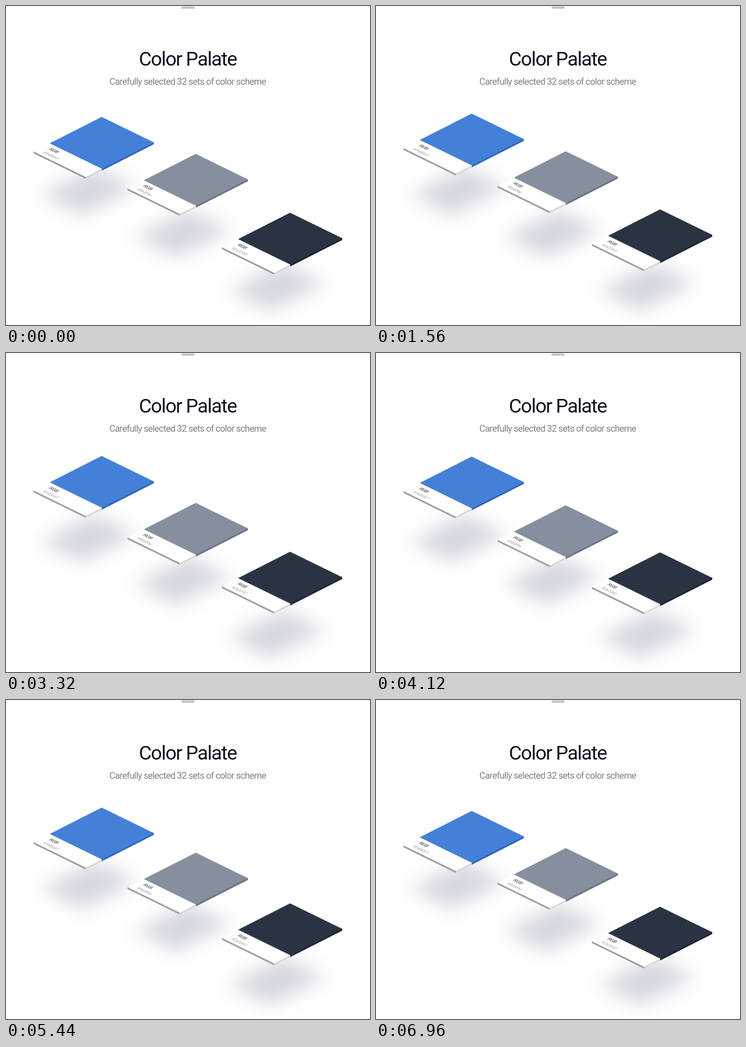
Animation of 799 by 701 pixels, one loop 7000 ms. Source, as an HTML page:

```html
<!DOCTYPE html>
<html lang="en">
<head>
<meta charset="utf-8">
<title>Color Palate</title>
<style>
  html, body { margin: 0; width: 100%; height: 100%; overflow: hidden; background: #fff; }
  svg { display: block; width: 799px; height: 701px; }
  text { font-family: Roboto, "Open Sans", sans-serif; }
  .title { font-size: 43px; letter-spacing: -1.6px; fill: #110d20; text-anchor: middle; }
  .subtitle { font-size: 20px; letter-spacing: -.8px; fill: #828282; text-anchor: middle; }
  .name { font-size: 11px; letter-spacing: -.4px; fill: #34343f; }
  .hex { font-size: 10px; letter-spacing: -.5px; fill: #a6a6a6; }
  .face { fill: var(--face); }
  .side { fill: var(--side); }
  .shadow { fill: #d5d8df; }

  .blue { --face: #4480d8; --side: #3064b6; }
  .gray { --face: #868f9e; --side: #6a7182; }
  .dark { --face: #2a3342; --side: #1d2533; }

  /* Each half of the loop eases in and out */
  .float { animation: float 7s cubic-bezier(.333, 0, .667, 1) infinite; }
  .gray .float { animation-delay: -2.13s; }
  @keyframes float {
    0%, 100% { transform: translateY(0); }
    50% { transform: translateY(-17.7px); }
  }
</style>
</head>
<body>
<svg viewBox="0 0 799 701">
  <defs>
    <filter id="blur" x="-50%" y="-70%" width="200%" height="240%" color-interpolation-filters="sRGB">
      <feGaussianBlur stdDeviation="20"/>
    </filter>

    <!-- Both shapes are placed by the card's top corner -->
    <polygon id="shadow" class="shadow" filter="url(#blur)"
      points="-15,110 77,155 -43,216 -134,171"/>
    <g id="card">
      <polygon fill="#9c9c9c" points="-149.5,75 -35,131 -35,136 -149.5,80"/>
      <polygon fill="#d6d6d6" points="-35,131 .5,113 .5,118 -35,136"/>
      <polygon class="side" points=".5,113 114.5,55 114.5,60 .5,118"/>
      <polygon fill="#fff" points="-113.5,57.7 1,113.7 -35,132 -149.5,76"/>
      <polygon class="face" points="0,0 114.5,56 .5,114 -114,58"/>
      <text class="name" transform="matrix(.898 .439 -.892 .452 -114 58)" x="13" y="16.5">RGB</text>
    </g>
  </defs>

  <rect x="385" y="1" width="29" height="5" rx="2.5" fill="#c4c4c4"/>
  <text class="title" x="399" y="131">Color Palate</text>
  <text class="subtitle" x="399" y="173">Carefully selected 32 sets of color scheme</text>

  <use href="#shadow" x="210" y="243.8"/>
  <use href="#shadow" x="416.5" y="336.8"/>
  <use href="#shadow" x="623.5" y="454.3"/>

  <g class="blue" transform="translate(210 243.8)">
    <g class="float">
      <use href="#card"/>
      <text class="hex" transform="matrix(.898 .439 -.892 .452 -114 58)" x="13" y="32">#3480d7</text>
    </g>
  </g>
  <g class="gray" transform="translate(416.5 336.8)">
    <g class="float">
      <use href="#card"/>
      <text class="hex" transform="matrix(.898 .439 -.892 .452 -114 58)" x="13" y="32">#868f9e</text>
    </g>
  </g>
  <g class="dark" transform="translate(623.5 454.3)">
    <g class="float">
      <use href="#card"/>
      <text class="hex" transform="matrix(.898 .439 -.892 .452 -114 58)" x="13" y="32">#2a3342</text>
    </g>
  </g>
</svg>
</body>
</html>
```
